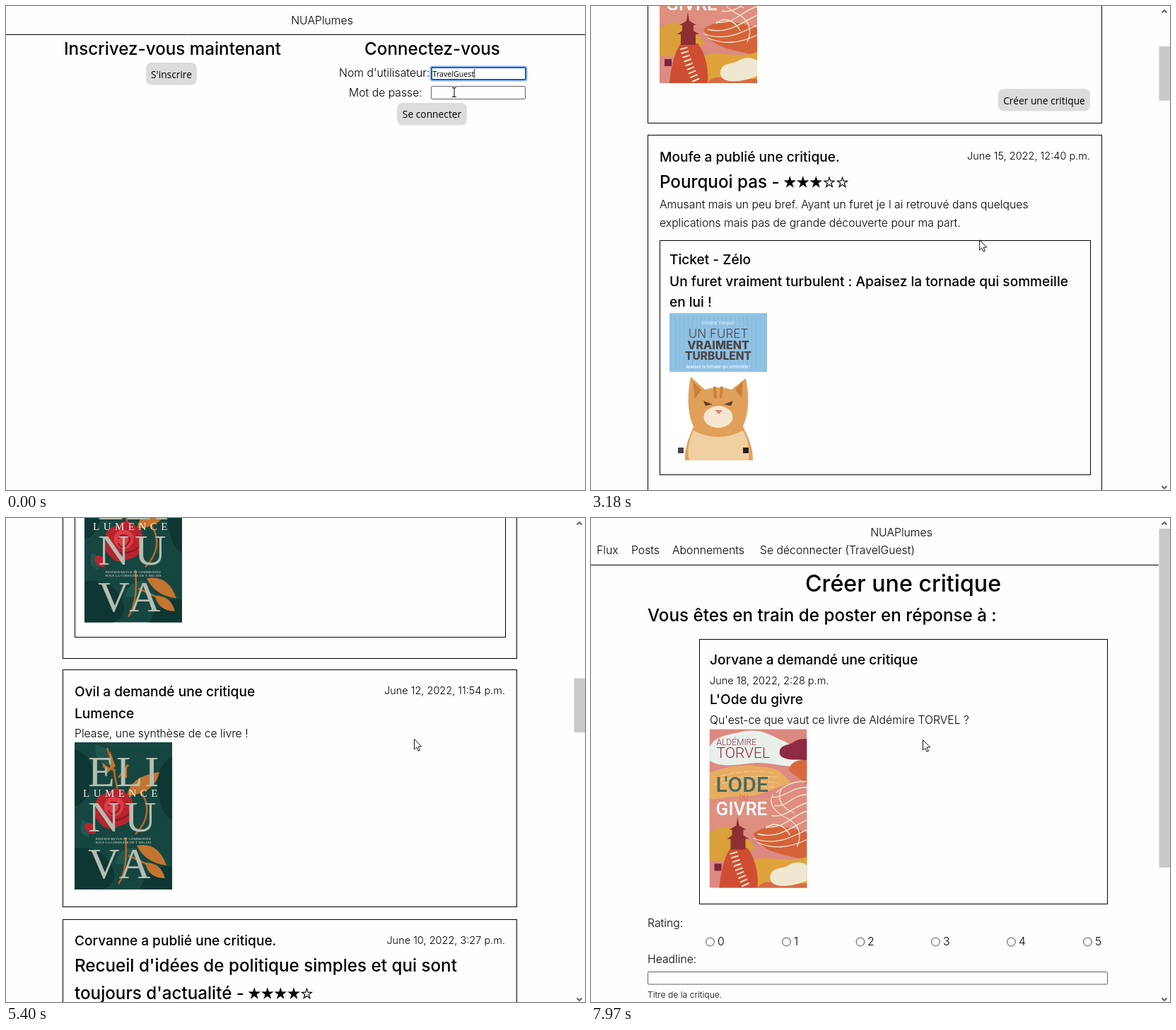
These frames come from a looping animation (819x684 px, 8000 ms). An HTML page:

```html
<!DOCTYPE html>
<html lang="fr">
<head>
<meta charset="utf-8">
<title>Critiques</title>
<style>
/* whole pixels keep the borders crisp while scrolling */
@property --s { syntax: '<integer>'; inherits: true; initial-value: 0; }
html, body { margin: 0; width: 100%; height: 100%; overflow: hidden; background: #fefefe; }
svg { display: block; }
#stage { animation: scroll 8s infinite linear; }
text { font: 350 15.75px Inter, sans-serif; font-optical-sizing: none; fill: #000; white-space: pre; }
.h1 { font-size: 32.2px; font-weight: 450; }
.h2 { font-size: 24.2px; font-weight: 450; }
.h3 { font-size: 19.1px; font-weight: 500; }
.date { font-size: 14.5px; }
.end { text-anchor: end; }
.mid { text-anchor: middle; }
.small { font-size: 12.2px; }
.stars { font: 20.7px "DejaVu Sans", sans-serif; stroke: #000; stroke-width: .5; }
.btn rect { fill: #dcdcdc; rx: 8px; height: 31.5px; }
.btn text { font: 13.8px "Open Sans", sans-serif; text-anchor: middle; }
.field { font: 10.7px "Open Sans", sans-serif; }
.box { fill: none; stroke: #000; }
.input { fill: #fff; stroke: #62626b; rx: 1.5px; }
.radio circle { fill: #fff; stroke: #77777f; stroke-width: 1.3; }
.track { fill: #fefefe; }
.thumb { fill: #c9c9c9; }
.arrow { fill: none; stroke: #5a5a5a; stroke-width: 1.8; }

.login, .feed, .review, .focus, .caret, .dots, .beam, .ptr { animation: 8s infinite step-end; }
.login { animation-name: login; }
.feed { animation-name: feed; }
.review { animation-name: review; }
.focus { animation-name: focus; }
.caret { animation-name: caret; }
.dots { animation-name: dots; }
.beam { animation-name: beam; }
.ptr { animation-name: ptr; }
.mouse { animation: mouse 8s infinite linear; }
.btn .go { animation: go 8s infinite linear; }
.btn .reply { animation: reply 8s infinite linear; }
.page { transform: translateY(calc(var(--s) * -1px)); }
.feed .thumb { transform: translateY(calc(var(--s) * .1211px)); }

@keyframes scroll {
  0%, 36.5% { --s: 0; animation-timing-function: cubic-bezier(.33, .1, .67, .57); }
  39.75%, 40.1% { --s: 348; animation-timing-function: cubic-bezier(.4, .45, .75, 1); }
  47.5%, 55.375% { --s: 1387; animation-timing-function: cubic-bezier(.35, .15, .65, 1); }
  60.875%, 65.25% { --s: 2030; animation-timing-function: cubic-bezier(.33, .1, .67, .6); }
  67.5%, 67.85% { --s: 1747; }
  77%, 77.4% { --s: 148; animation-timing-function: ease-out; }
  78.5%, 100% { --s: 0; }
}
@keyframes login { 0% { opacity: 1; } 14.75%, 100% { opacity: 0; } }
@keyframes feed { 0% { opacity: 0; } 14.75% { opacity: 1; } 92.25%, 100% { opacity: 0; } }
@keyframes review { 0% { opacity: 0; } 92.25%, 100% { opacity: 1; } }
@keyframes focus { 0% { transform: none; } .75%, 100% { transform: translateY(27px); } }
@keyframes caret {
  0% { transform: translate(662.5px, 0); }
  .75% { transform: translate(604.5px, 27px); }
  10.875%, 100% { transform: translate(684.5px, 27px); }
}
@keyframes dots { 0% { opacity: 0; } 10.875%, 100% { opacity: 1; } }
@keyframes beam { 0% { opacity: 1; } 3.25%, 100% { opacity: 0; } }
@keyframes ptr { 0% { opacity: 0; } 3.25%, 100% { opacity: 1; } }
@keyframes go { 0%, 5.5% { fill: #dcdcdc; } 9.25%, 100% { fill: #c2c2c2; } }
@keyframes reply { 0%, 85.75% { fill: #dcdcdc; } 89.5%, 100% { fill: #c2c2c2; } }
@keyframes mouse {
  0%, .75% { transform: translate(634px, 122px); }
  3.25% { transform: translate(628px, 128px); }
  9.75%, 14.4% { transform: translate(598px, 148px); }
  19%, 23.1% { transform: translate(595px, 178px); }
  24.75%, 27.6% { transform: translate(442px, 190px); }
  27.625%, 28% { transform: translate(419px, 220px); }
  28.8% { transform: translate(384px, 262px); }
  30% { transform: translate(402px, 350px); }
  30.8% { transform: translate(430px, 364px); }
  32.2% { transform: translate(505px, 230px); }
  32.9% { transform: translate(530px, 132px); }
  33.5%, 39.75% { transform: translate(549px, 330px); }
  47.5%, 55.375% { transform: translate(552px, 342px); }
  60.875%, 65.25% { transform: translate(570px, 330px); }
  67.5%, 67.85% { transform: translate(577px, 312px); }
  77%, 78.5% { transform: translate(534px, 239px); animation-timing-function: ease-in-out; }
  85.4%, 92.25% { transform: translate(640px, 478px); animation-timing-function: ease-in-out; }
  99.6%, 100% { transform: translate(469px, 313px); }
}
/* book covers */
.sans { font-family: Roboto, sans-serif; }
.serif { font: 62px "Liberation Serif", serif; fill: #b4bdb1; }
.tiny { font: 5px "Liberation Serif", serif; fill: #e4e6da; text-anchor: middle; }
.white { fill: #fff; }
</style>
</head>
<body>
<svg id="stage" width="819" height="684" viewBox="0 0 819 684">
<defs>
  <symbol id="ode" viewBox="0 0 138 224">
    <path fill="#dc8a82" d="M0 0h138v224H0z"/>
    <path fill="#e9f0ea" d="M0 26C8 8 28 8 48 3c30-5 40 8 58 14 12 5 12 16 22 20 8 4 10 8 10 14-30 6-50-6-78-3S14 54 0 44z"/>
    <path fill="#8e2a43" d="M138 14c-16-2-18 6-28 8-12 2-14 14-6 18 10 5 22 2 34 4z"/>
    <path fill="#d9683f" d="M138 44c-14-2-24 4-26 14l26 20z"/>
    <path fill="#e7ad62" d="M0 62c26-12 60-14 92-6 10 4 16 12 24 20-22 6-38 16-62 20-22 4-34 8-54 2z"/>
    <path fill="#de8f80" d="M0 100c30-6 64-8 90-2l48-14v70l-60-6-78-8z"/>
    <path fill="#d9a03b" d="M0 146c14-10 30-10 38-2 10 10 22 12 26 24l-20 18H0z"/>
    <path fill="#d5633a" d="M62 148c20-16 46-12 76-2v40c-30-10-62-8-76-38z"/>
    <path fill="#dfa33c" d="M56 188c24-14 52 4 82-8v44H50z"/>
    <path fill="#cf4e33" d="M14 224c2-24 8-46 16-56h24c10 12 16 36 14 56z"/>
    <path fill="#d76b45" d="M68 224c8-12 20-8 30-6h40v6z"/>
    <path fill="#efe7cf" d="M86 208c2-14 18-10 26-16 10-6 20-4 26 0v22c-18 8-54 14-52-6z"/>
    <path fill="#8d3033" d="M40 124l2 12 10 6h-4v8l8 5h-5v15H30v-15h-5l7-5v-8h-4l10-6z"/>
    <g fill="none" stroke="#f7ead2" stroke-width="1.3">
      <path d="M138 74c-20-2-34 8-44 16M138 82c-22 0-30 14-48 14M138 92c-24 2-26 18-46 16M138 104c-18 4-30 22-50 18M138 116c-20 4-32 26-58 22M138 128c-18 8-40 28-70 20M138 142c-20 10-46 24-76 12M138 156c-26 12-48 14-70 4M90 92c-8 14 4 26 20 34s22 22 14 40M102 84c-8 16 2 28 18 34M80 140c10-10 26-6 34 10"/>
      <path stroke-dasharray="2 4" stroke-width="11" d="M34 174q6 22 18 48"/>
    </g>
    <path stroke="#f2cf96" stroke-dasharray="9 2" fill="none" d="M16 66q40-10 76-4M12 72q46-8 86-4M6 78q44-8 92-2M28 84q30-6 64-2"/>
    <text class="sans" x="10" y="22" style="font-size:12px;fill:#8e2a43">ALDÉMIRE</text>
    <text class="sans" x="10" y="40" style="font-size:21px;fill:#8e2a43">TORVEL</text>
    <text class="sans" x="9" y="88" style="font-size:30px;font-weight:500;fill:#466a63">L'ODE</text>
    <text class="sans" x="42" y="100" style="font-size:10px;fill:#d5633a">DU</text>
    <text class="sans white" x="9" y="121" style="font-size:26px;font-weight:500">GIVRE</text>
    <path fill="#7a2440" d="M7 190h10v10H7z"/>
  </symbol>

  <symbol id="furet" viewBox="0 0 138 208">
    <path fill="#fff" d="M0 0h138v208H0z"/>
    <path fill="#90c2e4" d="M0 0h138v83H0z"/>
    <path stroke="#6ea7d0" stroke-width="76" stroke-dasharray="1 5" d="M2 42h136" opacity=".3"/>
    <text class="mid white" x="69" y="16" style="font-size:6.5px">Ondine Varquel</text>
    <text class="mid" x="69" y="35" style="font-size:17px;fill:#4b4548">UN FURET</text>
    <text class="mid" x="69" y="51" style="font-size:16px;font-weight:800;fill:#4b4548">VRAIMENT</text>
    <text class="mid" x="69" y="66" style="font-size:15.5px;font-weight:800;fill:#4b4548">TURBULENT</text>
    <text class="mid white" x="69" y="78" style="font-size:5.6px;font-weight:500">Apaisez la tornade qui sommeille !</text>
    <path fill="#e0a05a" d="M22 208c0-24 8-36 12-48-10-20-8-50-4-70l20 18q20-6 38 0l20-16c4 20 6 46-4 68 6 14 14 26 14 48z"/>
    <path fill="#f0cfa0" d="M34 166q34 18 70 0c8 14 10 26 8 42H28c-4-14 0-30 6-42z"/>
    <path fill="#f7e6cf" d="M52 138q18-14 34 0c10 14-4 24-17 24s-27-10-17-24z"/>
    <path fill="#c97f3e" d="M33 96l12 13-9 12zM104 96l-11 12 9 12zM62 104h4l1 16h-4zM72 104h4l-2 16h-3z"/>
    <path fill="#5a4028" d="M48 124l13 5-10 2zM90 124l-13 5 10 2z"/>
    <path fill="#d58475" d="M64 137h11l-5.500 6z"/>
    <path fill="#444" d="M12 190h8v8h-8z"/>
    <path fill="#222" d="M104 190h8v8h-8z"/>
  </symbol>

  <symbol id="lumence" viewBox="0 0 138 208">
    <path fill="#164640" d="M0 0h138v208H0z"/>
    <path fill="#0e3632" d="M0 10q30 10 24 44T0 90zM138 20q-26 16-20 50t20 40zM0 150q34-6 50 20t-10 38H0zM138 176q-30-6-46 32h46z"/>
    <path fill="#1f5750" d="M30 4q26 4 20 28-24-4-20-28zM88 150q-26-4-30 22 24 4 30-22zM10 110q16 4 10 24-16-4-10-24z"/>
    <g fill="none" stroke="#b5692d" stroke-width="2.500">
      <path d="M62 80Q58 40 46 8M62 50l14-18M58 40l-18-6M94 70q20 30-8 60M62 200q14-20 10-66M76 160l30 14"/>
    </g>
    <g fill="#c4752f">
      <path d="M74 76q4-28 46-34-6 30-46 34zM88 146q30-6 42 28-30-4-42-28zM100 170q22 0 28 22-24 0-28-22zM50 12l8 22-8 4zM38 28l14 10-6 6zM74 30l-8 22 8-2z"/>
    </g>
    <path fill="#b8242f" d="M30 92q-2-18 16-20 14-14 26 0 14 6 8 22 4 20-16 24-18 10-28-4-10-8-6-22z"/>
    <path fill="#dd3c45" d="M42 88q4-14 18-10 14 4 8 18-8 14-20 6-8-6-6-14z"/>
    <path fill="none" stroke="#8d1724" stroke-width="2" d="M36 96q8 20 30 12t8-24M48 90q4-8 12-4t0 12-12-2"/>
    <path fill="#b8242f" d="M14 118q4-8 12-2 8 8 2 14-12 0-14-12z"/>
    <text class="serif" x="19" y="62" style="letter-spacing:2px">ELI</text>
    <text class="serif" x="19" y="126" style="letter-spacing:7px">NU</text>
    <text class="serif" x="19" y="192" style="letter-spacing:7px">VA</text>
    <text class="serif" x="12" y="77" style="font-size:15px;fill:#f0f0e6;letter-spacing:5.500px">LUMENCE</text>
    <text class="tiny" x="69" y="138">ÉDITION REVUE ET COMMENTÉE</text>
    <text class="tiny" x="69" y="143">SOUS LA CONDUITE DE T. BELUIS</text>
  </symbol>

  <g id="top">
    <text class="mid" x="439" y="26">NUAPlumes</text>
    <text x="8" y="51">Flux</text>
    <text x="57" y="51">Posts</text>
    <text x="115" y="51">Abonnements</text>
    <text x="239" y="51">Se déconnecter (TravelGuest)</text>
    <path stroke="#000" d="M0 66.500h803"/>
  </g>
  <g id="bar">
    <path class="track" d="M803 0h16v684h-16z"/>
    <path class="arrow" d="M807.500 9.500l3.500-3.500 3.500 3.500M807.500 678.500l3.500 3.500 3.500-3.500"/>
  </g>
</defs>

<g class="login">
  <text class="mid" x="447" y="26">NUAPlumes</text>
  <path stroke="#000" d="M0 40.500h819"/>
  <text class="h2" x="82" y="69">Inscrivez-vous maintenant</text>
  <text class="h2 mid" x="603" y="69">Connectez-vous</text>
  <g class="btn"><rect x="198" y="80" width="72"/><text x="234" y="102">S'inscrire</text></g>
  <text x="471" y="100">Nom d'utilisateur:</text>
  <text x="485" y="128">Mot de passe:</text>
  <rect class="input" x="601.500" y="86.500" width="133" height="18"/>
  <rect class="input" x="601.500" y="113.500" width="133" height="18"/>
  <g class="focus" fill="none" stroke-width="2">
    <rect x="600" y="85" width="137" height="21" rx="3" stroke="#b5cef5"/>
    <rect x="602" y="87" width="133" height="17" rx="1" stroke="#0b5bd3"/>
  </g>
  <text class="field" x="603.500" y="100">TravelGuest</text>
  <path class="dots" d="M607 122.500h73" fill="none" stroke="#000" stroke-width="5" stroke-linecap="round" stroke-dasharray="0 7.250"/>
  <path class="caret" d="M0 89v13" stroke="#000"/>
  <g class="btn"><rect class="go" x="553" y="137" width="99"/><text x="602.500" y="158">Se connecter</text></g>
</g>

<g class="feed">
  <g class="page">
    <use href="#top"/>
    <g class="btn"><rect x="170" y="82" width="162"/><text x="251" y="103">Demander une critique</text></g>
    <g class="btn"><rect x="503" y="82" width="130"/><text x="568" y="103">Créer une critique</text></g>

    <g transform="translate(81 130)">
      <rect class="box" x="-.5" y=".5" width="642" height="383"/>
      <text class="h3" x="16" y="37">Jorvane a demandé une critique</text>
      <text class="date end" x="625" y="35">June 18, 2022, 2:28 p.m.</text>
      <text class="h3" x="16" y="68">L'Ode du givre</text>
      <text x="16" y="94">Qu'est-ce que vaut ce livre de Aldémire TORVEL ?</text>
      <use href="#ode" x="16" y="103" width="138" height="224"/>
      <g class="btn"><rect class="reply" x="495" y="335" width="130"/><text x="560" y="357">Créer une critique</text></g>
    </g>

    <g transform="translate(81 530)">
      <rect class="box" x="-.5" y=".5" width="642" height="509"/>
      <text class="h3" x="16" y="38">Moufe a publié une critique.</text>
      <text class="date end" x="625" y="35">June 15, 2022, 12:40 p.m.</text>
      <text class="h2" x="16" y="75">Pourquoi pas -</text><text class="stars" x="191" y="74">★★★☆☆</text>
      <text x="16" y="104">Amusant mais un peu bref. Ayant un furet je l ai retrouvé dans quelques</text>
      <text x="16" y="130">explications mais pas de grande découverte pour ma part.</text>
      <rect class="box" x="16.500" y="149.500" width="609" height="331"/>
      <text class="h3" x="30" y="183">Ticket - Zélo</text>
      <text class="h3" x="30" y="214">Un furet vraiment turbulent : Apaisez la tornade qui sommeille</text>
      <text class="h3" x="30" y="243">en lui !</text>
      <use href="#furet" x="30" y="252" width="138" height="208"/>
    </g>

    <g transform="translate(81 1056)">
      <rect class="box" x="-.5" y=".5" width="642" height="366"/>
      <text class="h3" x="16" y="38">Zélo a demandé une critique</text>
      <text class="date end" x="625" y="35">June 14, 2022, 9:15 a.m.</text>
      <text class="h3" x="16" y="68">Un furet vraiment turbulent : Apaisez la tornade qui sommeille</text>
      <text class="h3" x="16" y="98">en lui !</text>
      <text x="16" y="125">Est-ce que ce livre est utile ?</text>
      <use href="#furet" x="16" y="133" width="138" height="208"/>
    </g>

    <g transform="translate(81 1439)">
      <rect class="box" x="-.5" y=".5" width="642" height="506"/>
      <text class="h3" x="16" y="38">Tavrel a publié une critique.</text>
      <text class="date end" x="625" y="35">June 13, 2022, 12:20 a.m.</text>
      <text class="h2" x="16" y="75">Impeccable -</text><text class="stars" x="174" y="74">★★★★★</text>
      <text x="16" y="104">La plus value de ce livre réside dans le fait que des explications de texte se trouvent</text>
      <text x="16" y="130">sur la page de gauche. Torvane Beluis s'évertue depuis plusieurs années à nous</text>
      <text x="16" y="155">rendre le Elinuvisme accessible. Le pari est une nouvelle fois gagné.</text>
      <rect class="box" x="16.500" y="174.500" width="609" height="302"/>
      <text class="h3" x="30" y="209">Ticket - Ovil</text>
      <text class="h3" x="30" y="238">Lumence</text>
      <use href="#lumence" x="30" y="247" width="138" height="209"/>
    </g>

    <g transform="translate(81 1961)">
      <rect class="box" x="-.5" y=".5" width="642" height="335"/>
      <text class="h3" x="16" y="38">Ovil a demandé une critique</text>
      <text class="date end" x="625" y="35">June 12, 2022, 11:54 p.m.</text>
      <text class="h3" x="16" y="69">Lumence</text>
      <text x="16" y="96">Please, une synthèse de ce livre !</text>
      <use href="#lumence" x="16" y="103" width="138" height="208"/>
    </g>

    <g transform="translate(81 2314)">
      <rect class="box" x="-.5" y=".5" width="642" height="520"/>
      <text class="h3" x="16" y="37">Corvanne a publié une critique.</text>
      <text class="date end" x="625" y="35">June 10, 2022, 3:27 p.m.</text>
      <text class="h2" x="16" y="74">Recueil d'idées de politique simples et qui sont</text>
      <text class="h2" x="16" y="113">toujours d'actualité -</text><text class="stars" x="261" y="112">★★★★☆</text>
      <text x="16" y="142">Un texte court et clair, facile à lire et à partager autour de soi.</text>
      <rect class="box" x="16.500" y="162.500" width="609" height="328"/>
      <text class="h3" x="30" y="197">Ticket - Ovil</text>
    </g>
  </g>
  <use href="#bar"/>
  <rect class="thumb" x="803.500" y="15" width="15.500" height="76.500"/>
</g>

<g class="review">
  <use href="#top"/>
  <text class="h1 mid" x="441.500" y="104">Créer une critique</text>
  <text class="h2" x="80" y="146">Vous êtes en train de poster en réponse à :</text>
  <rect class="box" x="153.500" y="171.500" width="577" height="374"/>
  <text class="h3" x="168" y="207">Jorvane a demandé une critique</text>
  <text class="date" x="168" y="234.500">June 18, 2022, 2:28 p.m.</text>
  <text class="h3" x="168" y="263">L'Ode du givre</text>
  <text x="168" y="290.500">Qu'est-ce que vaut ce livre de Aldémire TORVEL ?</text>
  <use href="#ode" x="167.500" y="298" width="138" height="225"/>
  <text x="80" y="578">Rating:</text>
  <g class="radio">
    <circle cx="168.500" cy="599" r="5.800"/><text x="179" y="604">0</text>
    <circle cx="276.500" cy="599" r="5.800"/><text x="287" y="604">1</text>
    <circle cx="381" cy="599" r="5.800"/><text x="391" y="604">2</text>
    <circle cx="487.500" cy="599" r="5.800"/><text x="498" y="604">3</text>
    <circle cx="594.500" cy="599" r="5.800"/><text x="605" y="604">4</text>
    <circle cx="702.500" cy="599" r="5.800"/><text x="713" y="604">5</text>
  </g>
  <text x="80" y="629">Headline:</text>
  <rect class="input" x="80.500" y="641.500" width="650" height="17.500"/>
  <text class="small" x="80" y="678">Titre de la critique.</text>
  <use href="#bar"/>
  <rect class="thumb" x="803.500" y="15" width="15.500" height="479"/>
</g>

<g class="mouse">
  <path class="beam" d="M-3-6.500h2.500l.5 1 .5-1H3M0-6v12M-3 6.500h2.500l.5-1 .5 1H3" fill="none" stroke="#000"/>
  <path class="ptr" d="M.5.5v14.500l3.300-3.100 2.300 5.300 2.300-1-2.300-5.200h4.600z" fill="#fff" stroke="#111"/>
</g>
</svg>
</body>
</html>
```
